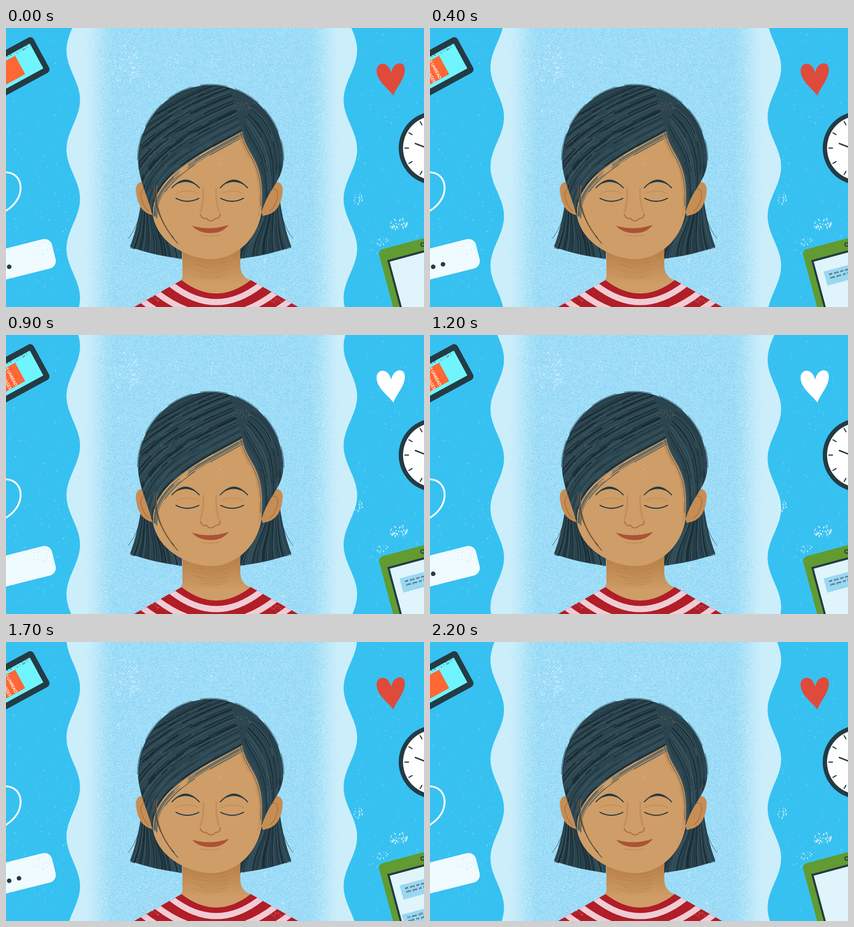
An HTML page with a canvas for the animation above (2300 ms loop, 917x611 px).

```html
<!DOCTYPE html>
<html lang="en">
<head>
<meta charset="utf-8">
<title>Calm</title>
<style>
html, body { margin: 0; width: 100%; height: 100%; overflow: hidden; background: #37c1f1; }
canvas { display: block; width: 100vw; height: 100vh; }
</style>
</head>
<body>
<canvas id="stage" width="917" height="611"></canvas>
<script>
const W = 917, H = 611, STEP = 100, STEPS = 23, PERIOD = 217;
const INK = '#243b44', SKIN = '#cf9d67', BROWN = '#ab7241', SHADE = '#bd855199';
const HAIR = ['#192b33', '#36525d', '#2b4550'];

let seed = 7;
function rnd() {
  seed = (seed + 0x6D2B79F5) | 0;
  let t = Math.imul(seed ^ (seed >>> 15), 1 | seed);
  t = (t + Math.imul(t ^ (t >>> 7), 61 | t)) ^ t;
  return ((t ^ (t >>> 14)) >>> 0) / 4294967296;
}
const between = (a, b) => a + (b - a) * rnd();
const mix = (a, b, u) => a + (b - a) * u;
const smooth = u => { u = Math.min(1, Math.max(0, u)); return u * u * (3 - 2 * u); };
const shift = (curve, dx, dy) => curve.map((v, i) => v + (i % 2 ? dy : dx));
const bezier = ([x, y, ...rest]) => `M${x} ${y}C${rest.join(' ')}`;
const bow = (x, y, w, sag) => `M${x - w / 2} ${y}q${w / 2} ${2 * sag} ${w} 0`;

function layer(draw) {
  const c = document.createElement('canvas');
  c.width = W; c.height = H;
  const ctx = c.getContext('2d');
  ctx.lineCap = 'round';
  draw(ctx);
  return c;
}
function fill(g, path, color) {
  g.fillStyle = color;
  g.fill(new Path2D(path));
}
function line(g, path, color, width) {
  g.strokeStyle = color;
  g.lineWidth = width;
  g.stroke(new Path2D(path));
}
function dot(g, x, y, r, color) {
  g.fillStyle = color;
  g.beginPath();
  g.arc(x, y, r, 0, 7);
  g.fill();
}
function box(g, x, y, w, h, r, color) {
  g.fillStyle = color;
  g.beginPath();
  g.roundRect(x, y, w, h, r);
  g.fill();
}
function tilted(g, x, y, deg, draw) {
  g.save();
  g.translate(x, y);
  g.rotate(deg * Math.PI / 180);
  draw();
  g.restore();
}
function clipped(g, path, draw) {
  g.save();
  g.clip(new Path2D(path));
  draw();
  g.restore();
}
// Draws once as given, once flipped about x = axis
function mirrored(g, axis, draw) {
  draw();
  g.save();
  g.translate(2 * axis, 0);
  g.scale(-1, 1);
  draw();
  g.restore();
}
function scratches(g, x, y, rx, ry, n, color, tall = 3) {
  g.fillStyle = color;
  for (let i = 0; i < n; i++) {
    const a = rnd() * 7, d = Math.sqrt(rnd());
    g.fillRect(x + Math.cos(a) * d * rx, y + Math.sin(a) * d * ry, between(.5, 1.6), between(.6, tall));
  }
}
// Brush strands blended between two Bezier curves
function strands(g, from, to, n, colors, maxWidth, broken) {
  for (let i = 0; i < n; i++) {
    const u = (i + rnd()) / n;
    g.setLineDash(broken ? [between(40, 170), between(5, 45)] : []);
    line(g, bezier(from.map((v, k) => mix(v, to[k], u))),
      colors[Math.floor(rnd() * colors.length)], between(.7, maxWidth));
  }
  g.setLineDash([]);
}

// Pale middle band with grain growing away from its edges
const band = layer(g => {
  const img = g.createImageData(W, H);
  const edge = [203, 238, 250], core = [157, 220, 247], grain = [64, 26, 6];
  for (let i = 0; i < W * H; i++) {
    const x = i % W, p = smooth((Math.min(x - 133, 770 - x) - 35) / 75);
    const n = (rnd() - .5) * Math.min(1, .1 + p * 1.6);
    for (let k = 0; k < 3; k++) img.data[i * 4 + k] = mix(edge[k], core[k], p) + n * grain[k];
    img.data[i * 4 + 3] = 255;
  }
  g.putImageData(img, 0, 0);
});

function wear(g) {
  for (const x of [66, 842]) scratches(g, x, 300, 78, 330, 150, '#aee5f9', 2.5);
  for (let i = 0; i < 22; i++) scratches(g, between(175, 725), between(0, H), 3, 12, 5, '#e6f6fd', 4);
  scratches(g, 262, 78, 34, 46, 95, '#fff', 4);
  scratches(g, 772, 374, 10, 12, 24, '#fff', 5);
  scratches(g, 861, 428, 20, 13, 55, '#fff', 5);
  scratches(g, 820, 465, 18, 10, 24, '#fff', 4);
}

function locks(g) {
  mirrored(g, 449, () => {
    fill(g, 'M298 370Q290 432 272 479Q325 499 386 505V450L324 395Z', HAIR[2]);
    strands(g, [299, 380, 292, 430, 285, 455, 272, 481], [335, 400, 345, 440, 378, 460, 386, 506], 48, HAIR, 2.4);
    line(g, 'M298 392Q287 440 268 461', INK, .9);
  });
}

function body(g) {
  const neck = g.createLinearGradient(0, 490, 0, 560);
  neck.addColorStop(0, '#b98049');
  neck.addColorStop(1, SKIN);
  fill(g, 'M387 450V545L384 553Q458 612 538 553Q514 545 514 520V450Z', neck);
  for (let y = 500; y < 548; y += 3) line(g, bow(between(440, 460), y, between(50, 95), 5), '#ae774377', 1);

  const shoulder = s => `M${385 - 105 * s} ${552 + 55 * s}Q461 ${611 + 133 * s} ${537 + 105 * s} ${552 + 55 * s}`;
  const shirt = shoulder(0) + 'L641 611H281Z';
  fill(g, shirt, '#b01e27');
  clipped(g, shirt, () => {
    for (let i = 0; i < 3; i++) line(g, shoulder(.2 + .31 * i), '#f1ccd4', 13);
  });
  mirrored(g, 461, () => scratches(g, 315, 592, 32, 14, 45, '#e4a5ad', 1.6));
}

const FRINGE = [518, 226, 450, 265, 318, 320, 322, 408];
const SIDE = [518, 226, 528, 285, 572, 285, 560, 408];

function hair(g) {
  const cap = 'M290 290A159 165 0 0 1 608 290C608 335 574 350 558 412H322C312 370 290 330 290 290Z';
  fill(g, cap, HAIR[2]);
  clipped(g, cap, () => {
    strands(g, FRINGE, [480, 100, 420, 115, 350, 150, 250, 215], 105, HAIR, 3.4, true);
    fill(g, 'M518 226L541 160L640 160V412H560Z', HAIR[2]);
    strands(g, SIDE, [543, 158, 612, 180, 613, 270, 605, 350], 44, HAIR, 2.6, true);
  });
  // Dry brush outline
  g.setLineDash([60, 18]);
  for (let i = 0; i < 5; i++) {
    const r = between(157, 161);
    line(g, `M${449 - r} 290A${r} ${r + 6} 0 0 1 ${449 + r} 290`, INK, 1);
  }
  g.setLineDash([]);
  scratches(g, 515, 172, 22, 10, 35, '#a97943', 1.5);
  scratches(g, 325, 240, 24, 50, 30, '#a97943', 1.3);
}

function face(g) {
  fill(g, bezier(SIDE) + 'C548 468 500 506 450 506C400 506 330 470 322 408'
    + 'C318 320 450 265 518 226Z', SKIN);
  strands(g, FRINGE, shift(FRINGE, 10, 10), 7, ['#bf804899', HAIR[1]], 1.3, true);
  strands(g, SIDE, shift(SIDE, -8, 6), 6, ['#bf804899', HAIR[1]], 1.4, true);
  strands(g, [322, 345, 322, 390, 345, 440, 380, 476], [332, 345, 328, 385, 338, 420, 362, 452], 6, [INK, BROWN], 1.4);

  mirrored(g, 447, () => {
    line(g, 'M433 352Q434 380 427 402', SHADE, 4);
    line(g, bow(398, 363, 50, -6), SHADE, 1.8);
    line(g, bow(398, 373, 50, 6.5), INK, 2.5);
    fill(g, bow(394, 351, 63, -19) + 'q-31 -28 -63 0Z', INK);
    line(g, bow(394, 350, 60, -16), INK, 2.2);
  });
  line(g, 'M426 408Q430 419 440 417Q449 428 460 417Q470 417 470 407', BROWN, 2.4);
  fill(g, 'M408 433Q448 445 489 431Q474 450 448 449Q423 449 408 433Z', '#aa5236');
  line(g, bow(449, 453, 42, 3), SHADE, 2);
  scratches(g, 468, 290, 14, 14, 12, '#e9d8b8', 2);
  scratches(g, 430, 400, 90, 85, 45, SHADE, 1);
}

function ears(g) {
  mirrored(g, 446, () => {
    fill(g, 'M330 345C302 330 284 336 285 355C287 386 299 409 330 411Z', '#c68d55');
    line(g, 'M312 356C298 345 292 362 299 379Q304 395 313 400', BROWN, 1.8);
  });
}

function phone(g, draw) { tilted(g, 75, 57, -28.5, draw); }
function tablet(g, draw) { tilted(g, 816, 487, -15, draw); }

function objects(g) {
  phone(g, () => {
    box(g, -157, -44, 160, 88, 9, INK);
    box(g, -160, -31, 151, 62, 0, '#70f5ff');
    scratches(g, -45, -29, 34, 5, 55, INK, 1.3);
    box(g, -160, -23, 110, 46, 0, '#ff6735');
  });
  line(g, 'M-6 316C22 314 33 334 32 352C31 376 14 392 -4 403', '#fff', 4);
  tilted(g, 103, 491, -14, () => {
    box(g, -158, -33, 160, 66, 17, '#effbff');
    scratches(g, -22, -14, 20, 16, 40, '#b9e6f6', 2);
  });
  dot(g, 942, 263, 80.5, INK);
  dot(g, 942, 263, 71, '#fff');
  for (let a = 120; a <= 240; a += 30) {
    tilted(g, 942, 263, a, () => line(g, 'M59 0H67', INK, 2.4));
  }
  line(g, 'M898 253L942 270', INK, 3);
  tablet(g, () => {
    box(g, 0, 0, 200, 240, 11, '#619b31');
    box(g, 14, 26, 180, 210, 0, INK);
    box(g, 18.5, 30.5, 180, 210, 0, '#e0f4fc');
    dot(g, 98, 13, 5, INK);
    dot(g, 98, 13, 2.8, '#619b31');
  });
}

const front = layer(g => [wear, locks, body, ears, hair, face, objects].forEach(draw => draw(g)));
const heart = 'M850 148C837 131 813 116 813 93C813 74 839 71 845 98C850 72 876 71 875 92C874 114 855 131 850 148Z';

function message(g, x, y, ...rows) {
  box(g, x, y, 120, 32, 0, '#9ad7f1');
  g.fillStyle = INK;
  g.font = 'bold 6px "Noto Sans Mono", monospace';
  rows.forEach((row, i) => g.fillText(row, x + 10, y + 11 + 8 * i));
}

function label(g) {
  g.rotate(Math.PI / 2);
  g.fillStyle = '#fff';
  g.font = 'bold 9px Lato, sans-serif';
  g.textAlign = 'center';
  g.fillText('5 UNREAD', 0, 75);
  g.fillText('MESSAGES', 0, 90);
}

function paint(n) {
  const crest = 49 + n * PERIOD / STEPS;
  const wave = y => 14.8 * Math.cos((y - crest) * 2 * Math.PI / PERIOD);
  g.fillStyle = '#37c1f1';
  g.fillRect(0, 0, W, H);
  g.save();
  g.beginPath();
  for (let y = -4; y <= H + 4; y += 4) g.lineTo(147.5 - wave(y), y);
  for (let y = H + 5; y >= -4; y -= 4) g.lineTo(755.5 + wave(y), y);
  g.clip();
  g.drawImage(band, 0, 0);
  g.restore();
  g.drawImage(front, 0, 0);

  fill(g, heart, n >= 7 && n < 14 ? '#fff' : '#df4b3b');

  const dots = (Math.floor(n / 3) + 1) % 4;
  for (let i = 0; i < dots; i++) dot(g, 7 + 21.5 * i, 523 - 5.5 * i, 5, INK);

  if (n < 3 || n >= 21) return;
  phone(g, () => label(g));
  tablet(g, () => {
    message(g, 34, 57, 'we are on our way', 'see you at home');
    if (n >= 14) message(g, 22, 120, 'it was all good', 'talk to you soon');
  });
}

const g = document.getElementById('stage').getContext('2d');
const start = performance.now();
let shown = -1;
function tick() {
  const n = Math.floor((performance.now() - start) / STEP) % STEPS;
  if (n !== shown) paint(shown = n);
  requestAnimationFrame(tick);
}
tick();
</script>
</body>
</html>
```
